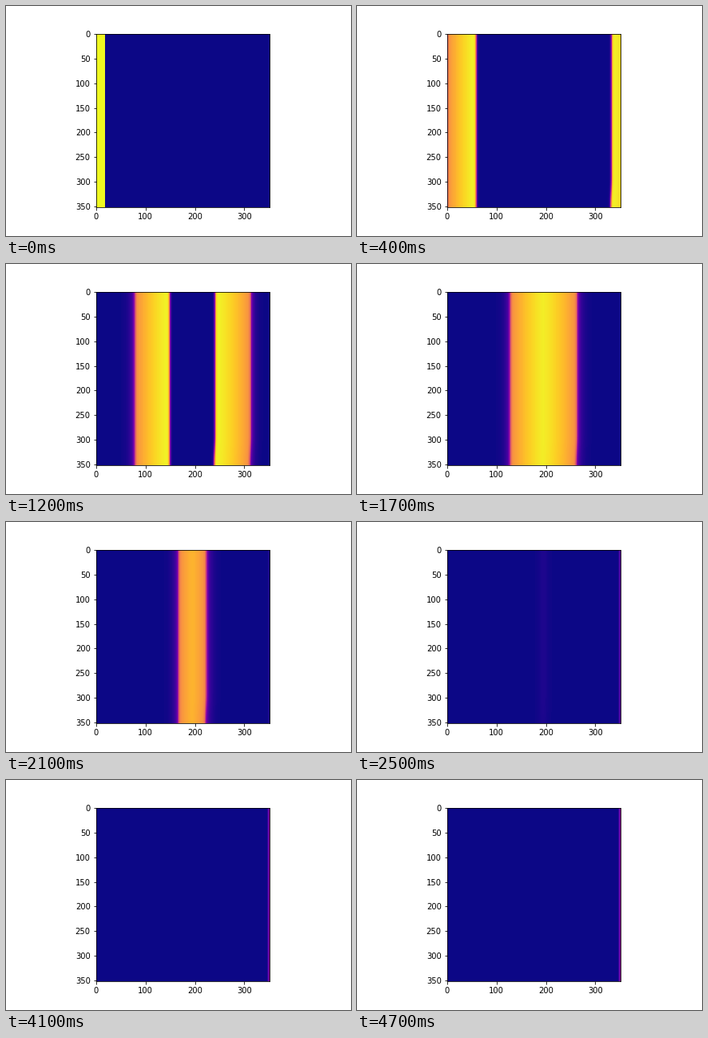
These frames come from a looping animation (432 px wide and 288 px high, 4.8 s). A matplotlib script:

```python
import numpy as np
import matplotlib.pyplot as plt
from matplotlib.animation import FuncAnimation

N = 352          # grid cells per side
FRAMES = 48
STRIP_START = 19

y, x = np.mgrid[0:N, 0:N].astype(float)


def smoothstep(v, lo, hi):
    s = np.clip((v - lo) / (hi - lo), 0, 1)
    return s * s * (3 - 2 * s)


def sigmoid(v):
    return 1 / (1 + np.exp(-np.clip(v, -40, 40)))


def soft_min(a, b, k):
    return -k * np.logaddexp(-a / k, -b / k)


# The right-hand wave runs slightly ahead near the lower border.
bend = 2.0 * smoothstep(y, 290, N)
xr = x + bend

# Times, in frames, at which the fronts and backs pass each cell.
front_left = np.where(x < 17.5, 0, 12 + (x - 148) / 11.25)
front_right = 12 + (240 - xr) / 11.5
back_left = 12 + (x - 78) / 9.8
back_right = 12 + (312 - xr) / np.where(xr < 312, 10, 8.25)

front = np.minimum(front_left, front_right)
back = soft_min(back_left, back_right, 0.6)


def wave(t):
    if t == 0:
        return (x < 17.5).astype(float)
    age = np.clip((t - front) / (back - front), 0, 1)
    plateau = 0.99 - 0.27 * age ** 1.4
    rise = np.where(x < 17.5, 1, sigmoid((t - front) / 0.1))
    fall = sigmoid((back - t) / 0.13)
    tail = 0.26 * np.exp(-np.clip(t - back, 0, 40) / 0.7)
    return rise * (plateau * fall + tail * (1 - fall))


def borders(t):
    """Faint activity left at the two side borders."""
    if t < STRIP_START:
        return np.zeros_like(x)
    grow = smoothstep(t, STRIP_START, 28)
    pulse = 1.0 if t % 3 == 2 else 0.85
    right = 0.36 * pulse * grow * smoothstep(x, 344, 351)
    left = 0.10 * grow * (x < 2)
    return right + left


def field(t):
    return np.maximum(wave(t), borders(t))


fig, ax = plt.subplots(figsize=(6, 4), dpi=72)
fig.subplots_adjust(left=0.125, right=0.9, bottom=0.125, top=0.88)
image = ax.imshow(field(0), cmap="plasma", vmin=0, vmax=1,
                  interpolation="nearest")


def update(t):
    image.set_data(field(t))
    return [image]


anim = FuncAnimation(fig, update, frames=FRAMES, interval=100, repeat=True,
                     repeat_delay=0)
plt.show()
```
